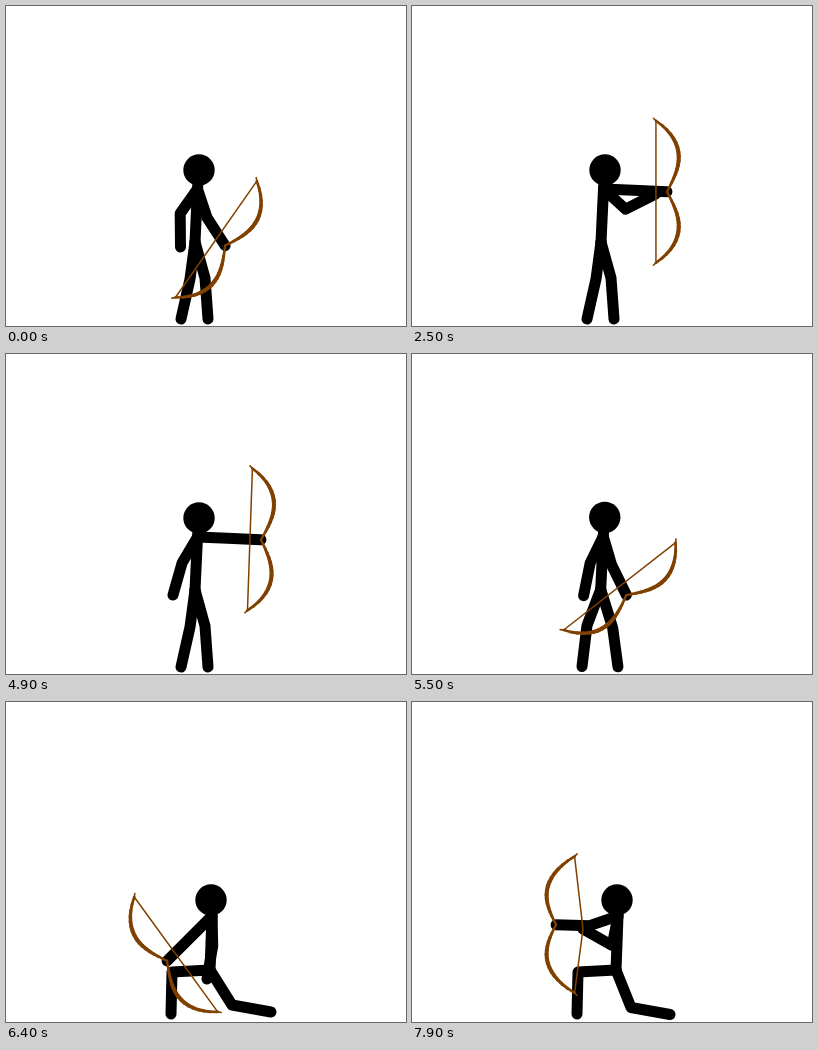
An HTML page with a canvas that plays this animation: 400x320 px, repeating every 8000 ms.

```html
<!DOCTYPE html>
<html lang="en">
<head>
<meta charset="utf-8">
<title>Archer</title>
<style>
html, body { margin: 0; width: 100%; height: 100%; overflow: hidden; background: #fff; }
canvas { display: block; width: 400px; height: 320px; }
</style>
</head>
<body>
<canvas id="stage" width="400" height="320"></canvas>
<script>
const LOOP = 8000, STEP = 100;
const WOOD = '#804000';
const UPPER = 30, FORE = 33.5;
const STRING_GAP = 11, LIMB = 71, MAX_PULL = 38;
const ctx = document.getElementById('stage').getContext('2d');

const clamp = k => Math.max(0, Math.min(1, k));
const mix = (a, b, k) => a + (b - a) * k;
const mixAll = (a, b, k) => a.map((v, i) => mix(v, b[i], k));
const add = (a, b) => a.map((v, i) => v + b[i]);
const span = (t, from, to) => clamp((t - from) / (to - from));

const linear = k => k;
const easeIn = k => k * k;
const smooth = k => k * k * (3 - 2 * k);
const windUp = k => smooth(k) * (1.5 * k - 0.5);

// Each joint: standing point, kneeling point, ease between them.
const joints = {
  head: [[193, 164], [205, 198], windUp],
  neck: [[191.5, 183], [206, 214], windUp],
  hip: [[189, 236], [204, 268], windUp],
  frontKnee: [[184, 273], [166, 270], Math.sqrt],
  frontFoot: [[175, 313], [165, 312], Math.sqrt],
  backKnee: [[199, 272], [226, 303], easeIn],
  backFoot: [[202, 313], [265, 310], easeIn]
};

// Bow arm: angle and reach. Draw hand: offset from the neck.
const hold = { rest: [64, 63], aim: [2.5, 63.5], low: [135, 63.5], aimLeft: [172, 62.5] };
const hand = {
  hang: [-17, 58], front: [7, 59], reach: [58, 9], string: [52, 5], full: [15.5, 2],
  loose: [17, 22], back: [-24.5, 58], knee: [-5, 63], stringLeft: [-51, 9], half: [-35, 13]
};

// Start value, then moves: from, to, target, ease.
const moves = {
  hold: [hold.rest, [500, 1200, hold.aim], [4900, 5200, hold.rest],
    [5200, 6400, hold.low, easeIn], [7000, 7600, hold.aimLeft]],
  tilt: [[35], [500, 1200, [0]], [3000, 3400, [2]], [4900, 5200, [35]],
    [5200, 6400, [144], smooth], [7000, 7600, [180]]],
  hand: [hand.hang, [1100, 1400, hand.front], [1400, 1700, hand.reach],
    [2400, 2500, hand.string], [3000, 3400, hand.full], [3900, 4200, hand.loose],
    [4300, 4900, hand.back], [5200, 6400, hand.knee],
    [7000, 7600, hand.stringLeft], [7600, 7900, hand.half]]
};

function valueAt([start, ...list], t) {
  return list.reduce((v, [from, to, target, ease = linear]) =>
    mixAll(v, target, ease(span(t, from, to))), start);
}

function along([x, y], deg, len) {
  const a = deg * Math.PI / 180;
  return [x + Math.cos(a) * len, y + Math.sin(a) * len];
}

// Two-bone arm; side says which way the elbow points.
function arm(neck, end, side) {
  const dx = end[0] - neck[0], dy = end[1] - neck[1], d = Math.hypot(dx, dy);
  const a = (d * d + UPPER * UPPER - FORE * FORE) / (2 * d);
  const h = side * Math.sqrt(Math.max(0, UPPER * UPPER - a * a));
  const elbow = [neck[0] + (dx * a - dy * h) / d, neck[1] + (dy * a + dx * h) / d];
  return [neck, elbow, end];
}

function line(points, width, color) {
  ctx.beginPath();
  points.forEach(p => ctx.lineTo(...p));
  ctx.lineWidth = width;
  ctx.strokeStyle = color;
  ctx.stroke();
}

function drawBow(grip, tilt, nock) {
  const pull = nock ? Math.hypot(nock[0] - grip[0], nock[1] - grip[1]) - STRING_GAP : 0;
  const bend = clamp(pull / MAX_PULL);
  const place = (x, y) => along(along(grip, tilt, x), tilt + 90, y);
  const limb = u => [
    12 * Math.sin(Math.PI * u) - STRING_GAP * u ** 6 - 17.5 * bend * u ** 1.5,
    LIMB * u * (1 - 0.09 * bend)
  ];
  const [x, y] = limb(1);
  const top = place(x, -y), bottom = place(x, y);

  line(nock ? [top, nock, bottom] : [top, bottom], 1.5, WOOD);
  for (const side of [-1, 1]) {
    const at = u => { const [x, y] = limb(u); return place(x, y * side); };
    for (let i = 0; i < 16; i++) {
      const u = i / 16;
      line([at(u), at(u + 1 / 16)], 2.3 + 1.8 * Math.sin(Math.PI * u), WOOD);
    }
    line([at(1), place(x - 2.5, (y + 2.5) * side)], 1.6, WOOD);
  }
}

function draw(t) {
  const kneel = span(t, 5200, 6400);
  const p = {};
  for (const name in joints) {
    const [stand, down, ease] = joints[name];
    p[name] = mixAll(stand, down, ease(kneel));
  }
  const slide = span(t, 7000, 7900);
  for (const name of ['backKnee', 'backFoot']) p[name] = add(p[name], [-7 * slide, 2.5 * slide]);

  const side = mix(1, -1, smooth(kneel));
  const bowArm = arm(p.neck, along(p.neck, ...valueAt(moves.hold, t)), side);
  const drawArm = arm(p.neck, add(p.neck, valueAt(moves.hand, t)), side);
  const pulling = (t > 3000 && t < 4000) || t > 7600;

  ctx.fillStyle = '#fff';
  ctx.fillRect(0, 0, 400, 320);
  ctx.lineCap = ctx.lineJoin = 'round';

  const limbs = [
    [p.head, p.neck, p.hip], [p.hip, p.frontKnee, p.frontFoot],
    [p.hip, p.backKnee, p.backFoot], drawArm, bowArm
  ];
  limbs.forEach(l => line(l, 11, '#000'));
  ctx.fillStyle = '#000';
  ctx.beginPath();
  ctx.arc(...p.head, 15.7, 0, Math.PI * 2);
  ctx.fill();

  drawBow(bowArm[2], valueAt(moves.tilt, t)[0], pulling && drawArm[2]);
}

const start = performance.now();
function tick() {
  const t = (performance.now() - start) % LOOP;
  draw(Math.floor(t / STEP) * STEP);
  requestAnimationFrame(tick);
}
tick();
</script>
</body>
</html>
```
